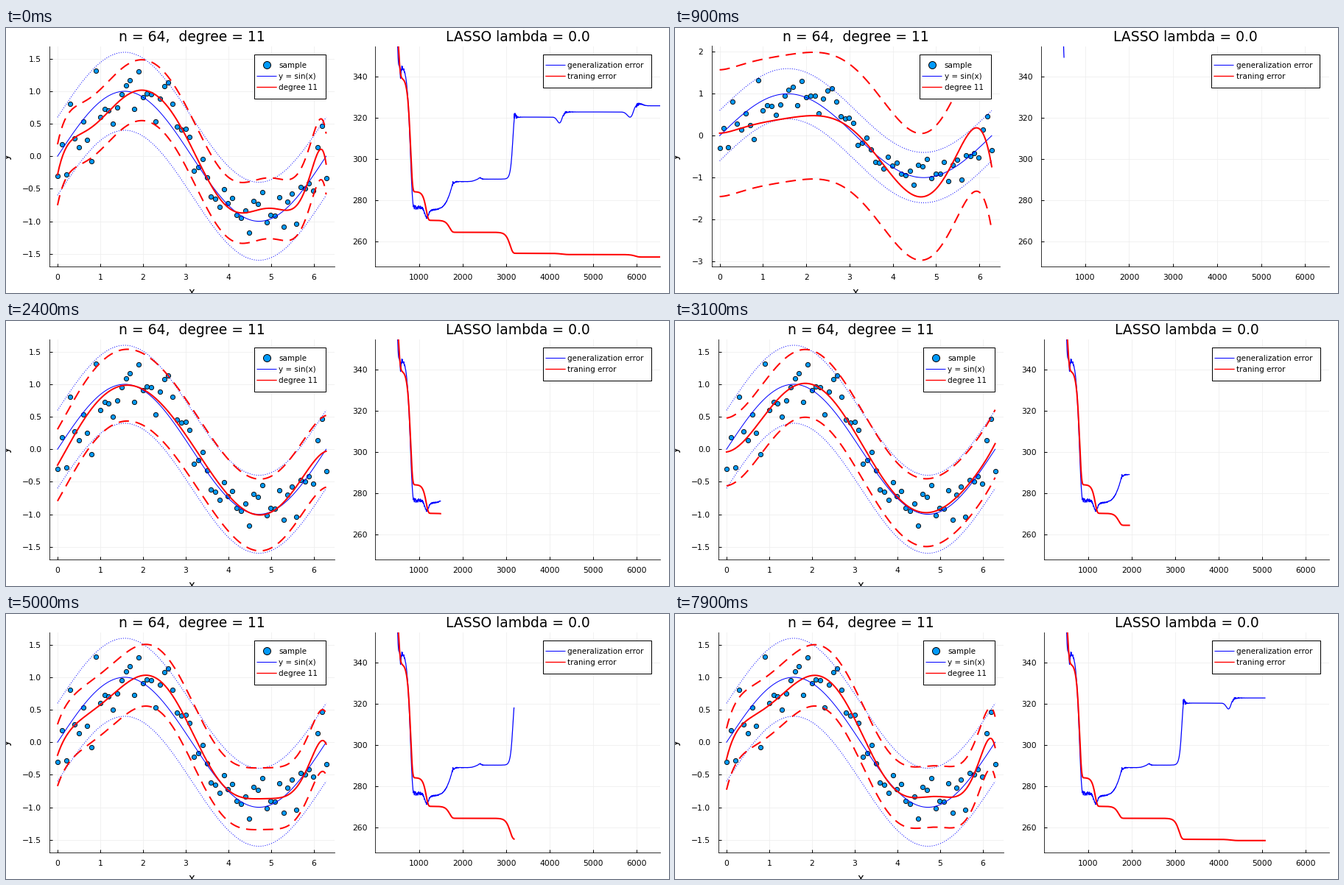
Write a matplotlib script that moves like this. It is 900x360 px and loops after 8 s.

```python
import numpy as np
import matplotlib.pyplot as plt
from matplotlib.animation import FuncAnimation
from matplotlib.patches import Rectangle

W, H = 900, 360
FRAMES, INTERVAL, STEP = 80, 100, 65
LAST = 6565
TOP, BOTTOM = 24.5, 324
BLUE, RED, DOT = "#0000ff", "#ff0000", "#009afa"

plt.rcParams.update({"font.family": "DejaVu Sans", "font.size": 10.7})

# observations, in hundredths
sample_x = np.linspace(0, 2 * np.pi, 64)
sample_y = np.array([
    -30, 18, -28, 81, 28, 14, 53, 25, -8, 132, 60, 73, 70, 50, 75, 95,
    109, 117, 73, 130, 91, 96, 95, 53, 89, 108, 113, 81, 46, 41, 42, 30,
    -22, -17, -4, -33, -62, -65, -78, -51, -72, -64, -90, -95, -83, -117, -69, -73,
    -55, -102, -90, -91, -63, -109, -70, -57, -104, -47, -49, -42, -53, 14, 47, -34]) / 100

epochs = np.arange(0, LAST + 36, 5)


def steps(base, *parts):
    """Plateaus joined by steps (height, centre, width): slow start, sharp end."""
    return base + sum(h * np.exp(-np.exp(np.minimum((epochs - c) / w, 50)))
                      for h, c, w in parts)


def bumps(*parts):
    return sum(h * np.exp(-((epochs - c) / w) ** 2) for h, c, w in parts)


def ringing(*parts):
    """Noise that flares up at an epoch and fades."""
    noise = np.random.default_rng(7).uniform(-1, 1, len(epochs))
    return noise * sum(a * np.exp(-np.maximum(epochs - c, 0) / w) * (epochs >= c)
                       for a, c, w in parts)


train = steps(252.6, (50, 519, 50), (55.5, 810, 43), (13.9, 1168, 46), (5.8, 1708, 58),
              (10.2, 3098, 59), (0.6, 4300, 90), (1.2, 5980, 70))
gen = (steps(326, (60, 495, 25), (69, 806, 46), (1.3, 1200, 30), (-13.8, 1720, 85),
             (-1.2, 2300, 50), (-30.1, 3158, 32), (-2.5, 4290, 30), (-3, 5930, 30))
       + bumps((-6, 578, 14), (-4.5, 1172, 60), (1.2, 1775, 25), (0.7, 2400, 35),
               (1.2, 3205, 25), (-3.2, 4240, 80), (-2.8, 5865, 100), (0.9, 6070, 110))
       + ringing((1.2, 600, 80), (1.1, 870, 400), (1.2, 1765, 40), (0.3, 2400, 60),
                 (2.6, 3195, 40), (0.8, 4320, 90), (1.0, 6000, 80)))

# fit minus sin(x) at key epochs, in hundredths at Chebyshev nodes
shapes = {
    520: [6, -18.5, -57.5, -19, -12.5, -21.5, 48.5, -74],
    910: [30, 19, -3, 3, 11, -3, 12, -1],
    1495: [-24.5, -18.5, -4.5, 4.5, 6, 0, 9.5, -3],
    2535: [0, -25, -19.5, 16.5, 2.5, 5, 3, 11],
    4095: [-24.5, -12, -12, -27, 2.5, 31, 3, 12, 2.5, -1, 16, -6],
    LAST: [-28.5, -10.5, -15, -27, 4, 22.5, -1, 10, 6.5, -5, 23.5, -12],
}
xs = np.linspace(0, 2 * np.pi, 300)
sine = np.sin(xs)


def polynomial(values):
    n = len(values) - 1
    nodes = np.pi * (1 - np.cos(np.pi * np.arange(n + 1) / n))
    return np.polynomial.Polynomial.fit(nodes, np.array(values) / 100, n)(xs)


keys = [0, *shapes]
curves = [0 * xs] + [sine + polynomial(v) for v in shapes.values()]


def fit_at(epoch):
    """Curve and half band width; both follow the drops of the training error."""
    i = min(np.searchsorted(keys, epoch, "right") - 1, len(keys) - 2)
    a, b = keys[i], keys[i + 1]
    ea, err, eb = np.interp([a, epoch, b], epochs, train)
    s = 0.3 * (epoch - a) / (b - a) + 0.7 * (err - ea) / (eb - ea)
    half = 0.468 * np.exp(0.007 * max(err - 252.6, 0) ** 1.1)
    return curves[i] * (1 - s) + curves[i + 1] * s, half


fig = plt.figure(figsize=(W / 72, H / 72), dpi=72, facecolor="white")


def panel(xlim, xticks, ylim):
    ax = fig.add_axes([0, 0, 1, 1])
    ax.set(xlim=xlim, ylim=ylim, xticks=xticks)
    ax.set_axisbelow(True)
    ax.grid(color="#eeeeee", lw=0.8)
    ax.spines[["top", "right"]].set_visible(False)
    ax.tick_params(direction="in", length=4, width=1)
    ax.tick_params(axis="x", pad=9.5)
    ax.tick_params(axis="y", pad=11)
    return ax


def place(ax, x0, x1):
    ax.set_position([x0 / W, 1 - BOTTOM / H, (x1 - x0) / W, (BOTTOM - TOP) / H])


left = panel((-0.06 * np.pi, 2.06 * np.pi), range(7), (-1.7, 1.7))
right = panel((0, 6545), range(1000, 7000, 1000), (248, 355))
right.set_yticks(range(260, 350, 20))

left.plot(sample_x, sample_y, "o", ms=6.2, mfc=DOT, mec="black", mew=0.9, zorder=2)
left.plot(xs, sine, color=BLUE, lw=1, zorder=3)
for off in (-0.6, 0.6):
    left.plot(xs, sine + off, color=BLUE, lw=1, ls=(0, (1, 2)),
              dash_capstyle="butt", zorder=3)
fit_line, = left.plot([], [], color=RED, lw=2, zorder=4)
bands = [left.plot([], [], color=RED, lw=2, ls=(0, (7, 4.5)),
                   dash_capstyle="butt", zorder=4)[0] for _ in range(2)]
gen_line, = right.plot([], [], color=BLUE, lw=1.25, zorder=3)
train_line, = right.plot([], [], color=RED, lw=2, zorder=4)

# overlay in pixels for legends and titles
over = fig.add_axes([0, 0, 1, 1], zorder=5)
over.set(xlim=(0, W), ylim=(H, 0))
over.axis("off")


def text(x, y, s, size, ha="center", **kw):
    return over.text(x, y, s, fontsize=size, ha=ha, va="baseline", **kw)


class Legend:
    def __init__(self, width, rows):
        self.box = Rectangle((0, 35.5), width, 15 * len(rows) + 15, fc="white", ec="black", lw=1)
        over.add_patch(self.box)
        self.marks, self.labels = [], []
        for i, (label, color, lw) in enumerate(rows):
            y = 50.5 + 15 * i
            if lw:
                mark, = over.plot([5, 31], [y, y], color=color, lw=lw, snap=False)
            else:
                mark, = over.plot([17.5], [y - 0.5], "o", ms=10, mfc=color, mec="black", mew=1)
            self.marks.append((mark, mark.get_xdata()))
            self.labels.append(text(0, y + 3.5, label, 10.4, ha="left"))

    def move(self, x):
        self.box.set_x(x + 0.5)
        for mark, dx in self.marks:
            mark.set_xdata(x + dx)
        for label in self.labels:
            label.set_x(x + 34.5)


key_l = Legend(97, [("sample", DOT, 0), ("y = sin(x)", BLUE, 1), ("degree 11", RED, 1.4)])
key_r = Legend(147, [("generalization error", BLUE, 1), ("traning error", RED, 1.4)])
title_l = text(0, 18, "n = 64,  degree = 11", 18.8)
title_r = text(0, 18, "LASSO lambda = 0.0", 18.8)
label_x = text(0, 364, "x", 14.8)
text(5, 174.5, "y", 14.8, rotation=90, rotation_mode="anchor")


def layout(wide):
    """Panels grow when the y labels of the left panel are short."""
    l0, l1, r0, r1 = (49.5, 441, 497, 888) if wide else (59, 445.5, 501.5, 888)
    place(left, l0, l1)
    place(right, r0, r1)
    title_l.set_x((l0 + l1) / 2)
    label_x.set_x((l0 + l1) / 2)
    title_r.set_x((r0 + r1) / 2)
    key_l.move(331 if wide else 336)
    key_r.move(727 if wide else 728)


def draw(k):
    epoch = STEP * (k - 1) if k else LAST
    y, half = fit_at(epoch)
    fit_line.set_data(xs, y)
    for line, sign in zip(bands, (-1, 1)):
        line.set_data(xs, y + sign * half)

    # y range fits the data with a 3 % margin
    lo, hi = min(-1.6, (y - half).min()), max(1.6, (y + half).max())
    pad = 0.03 * (hi - lo)
    lo, hi = lo - pad, hi + pad
    wide = hi - lo > 4
    step, digits = (1, 0) if wide else (0.5, 1)
    ticks = np.arange(np.ceil(lo / step), np.floor(hi / step) + 1) * step + 0.0
    left.set_yticks(ticks, [f"{t:.{digits}f}".replace("-", "−") for t in ticks])
    left.set_ylim(lo, hi)
    layout(wide)

    n = epoch // 5 + 1
    gen_line.set_data(epochs[:n], gen[:n])
    train_line.set_data(epochs[:n], train[:n])
    return []


anim = FuncAnimation(fig, draw, frames=FRAMES, interval=INTERVAL,
                     repeat=True, repeat_delay=0, blit=False)
plt.show()
```
